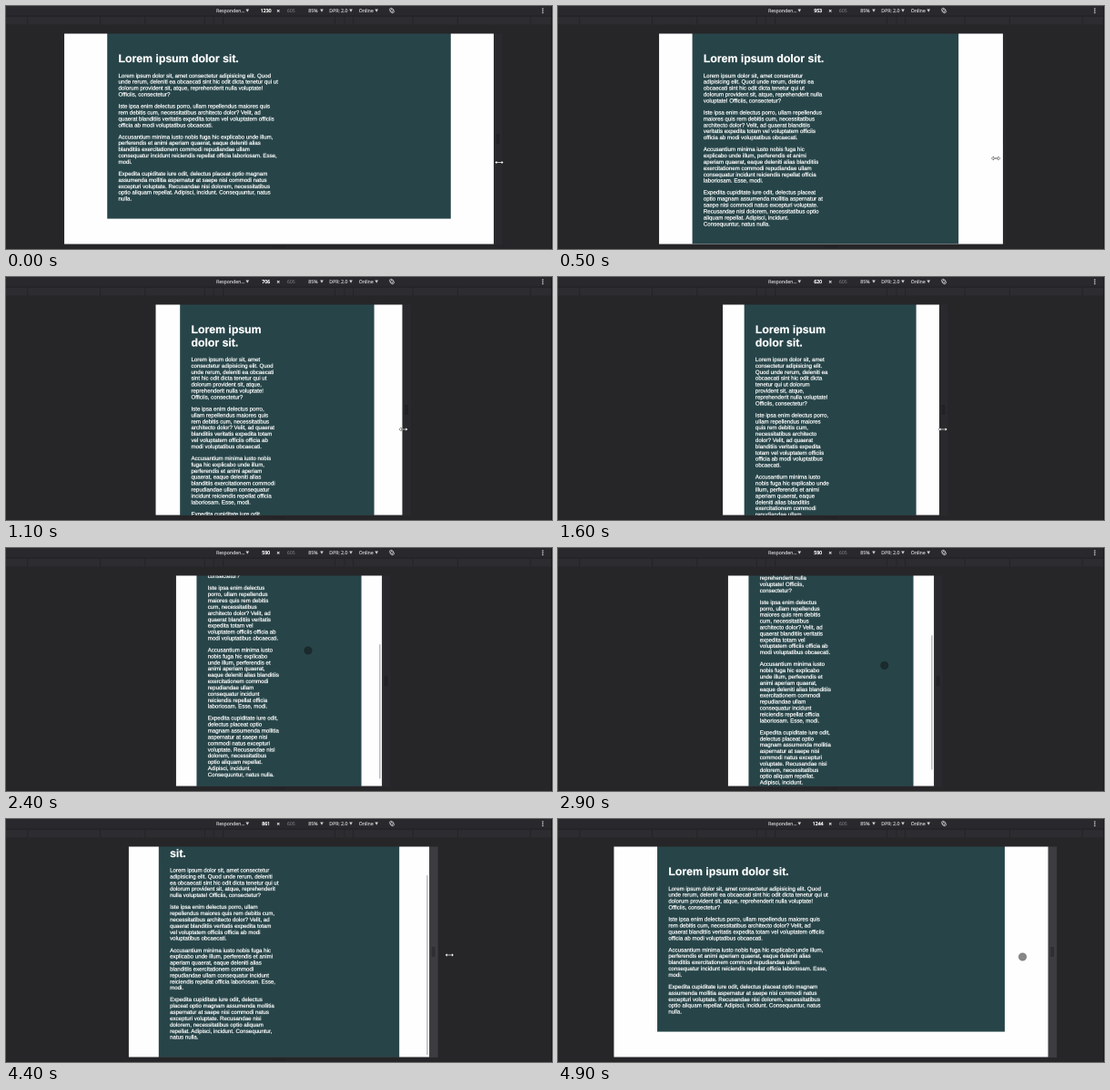
Write an HTML page with a canvas that moves like this. It is 600 by 268 pixels and loops after 5 s.

```html
<!DOCTYPE html>
<html lang="en">
<head>
<meta charset="utf-8">
<title>Responsive column</title>
<style>
  html, body { margin: 0; width: 100%; height: 100%; overflow: hidden; background: #262528; }
  canvas { display: block; width: 600px; height: 268px; }
</style>
</head>
<body>
<canvas id="stage" width="1200" height="536"></canvas>
<script>
const ctx = document.getElementById('stage').getContext('2d');
const LOOP = 5000, STEP = 100;
const CX = 300, TOP = 30.5, SCALE = 0.3837, VIEW_H = 605;
const WIDE = 1230, NARROW = 590, FINAL = 1244;
const UI = '"Open Sans", "Noto Sans", sans-serif';
const BODY = '"Liberation Sans", Arial, sans-serif';
const GRAY = '#d2d2d4';

const TITLE = 'Lorem ipsum dolor sit.';
const PARAS = [
  'Lorem ipsum dolor sit, amet consectetur adipisicing elit. Quod unde rerum, deleniti ea obcaecati sint hic odit dicta tenetur qui ut dolorum provident sit, atque, reprehenderit nulla voluptate! Officiis, consectetur?',
  'Iste ipsa enim delectus porro, ullam repellendus maiores quis rem debitis cum, necessitatibus architecto dolor? Velit, ad quaerat blanditiis veritatis expedita totam vel voluptatem officiis officia ab modi voluptatibus obcaecati.',
  'Accusantium minima iusto nobis fuga hic explicabo unde illum, perferendis et animi aperiam quaerat, eaque deleniti alias blanditiis exercitationem commodi repudiandae ullam consequatur incidunt reiciendis repellat officia laboriosam. Esse, modi.',
  'Expedita cupiditate iure odit, delectus placeat optio magnam assumenda mollitia aspernatur at saepe nisi commodi natus excepturi voluptate. Recusandae nisi dolorem, necessitatibus optio aliquam repellat. Adipisci, incidunt. Consequuntur, natus nulla.'
];

const part = (t, a, b) => Math.min(1, Math.max(0, (t - a) / (b - a)));
const ease = (t, a, b) => {
  const u = part(t, a, b);
  return u * u * (3 - 2 * u);
};
const mix = (a, b, k) => a + (b - a) * k;
const edge = width => CX + width * SCALE / 2;

// Page width: decays until it reaches the narrow size, then swings open.
function widthAt(t) {
  if (t > 3000) return mix(NARROW, FINAL, ease(t, 4090, 4790));
  return Math.max(NARROW, 560 + (WIDE - 560) * Math.exp(-Math.max(0, t - 200) / 562.3));
}

function scrollAt(t) {
  return ease(t, 2000, 2480) - 0.2 * Math.sin(Math.PI * part(t, 2600, 3200));
}

// The pointer leads the dragged edge, and leaves it to hover over the page.
function pointerAt(t) {
  const away = ease(t, 1600, 2400) - ease(t, 3700, 3800) + ease(t, 4700, 4900);
  const back = ease(t, 2600, 3200), out = ease(t, 3200, 3700);
  const hover = t > 4000 ? [510.5, 152]
    : [332 + 53.5 * back + 40.5 * out, 113 + 33 * back + 7 * out];
  const grip = edge(widthAt(t > 200 ? t + 60 : t)) + 6;
  const gripY = t < 3000 ? 168 + 4.5 * (1 - ease(t, 200, 500)) : 150;
  return [mix(grip, hover[0], away), mix(gripY, hover[1], away)];
}

function box(x, y, w, h, color) {
  ctx.fillStyle = color;
  ctx.fillRect(x, y, w, h);
}

function poly(points, fill, stroke) {
  ctx.beginPath();
  points.forEach(([x, y]) => ctx.lineTo(x, y));
  ctx.closePath();
  if (stroke) {
    ctx.strokeStyle = stroke;
    ctx.lineWidth = 0.7;
    ctx.stroke();
  }
  ctx.fillStyle = fill;
  ctx.fill();
}

// Text with a thin outline of its own colour for a little extra weight.
function write(text, x, y, font, color, weight) {
  ctx.font = font;
  ctx.fillStyle = ctx.strokeStyle = color;
  ctx.lineWidth = weight;
  ctx.fillText(text, x, y);
  ctx.strokeText(text, x, y);
}

function wrap(text, font, max) {
  ctx.font = font;
  const lines = [];
  let line = '';
  for (const word of text.split(' ')) {
    const next = line ? line + ' ' + word : word;
    if (line && ctx.measureText(next).width > max) {
      lines.push(line);
      line = word;
    } else line = next;
  }
  return lines.concat(line);
}

// Flows the article for a column width; sizes are in page pixels.
function flow(col) {
  const rows = [];
  let y = 53.44;
  const add = (text, font, lead, ascent) => {
    for (const line of wrap(text, font, col)) {
      rows.push({ line, font, y: y + ascent });
      y += lead;
    }
  };
  add(TITLE, `bold 32px ${BODY}`, 37, 29);
  y += 21.44;
  for (const p of PARAS) {
    add(p, `16px ${BODY}`, 18, 14);
    y += 16;
  }
  return { rows, height: y + 32 };
}

function label(text, x, arrowX) {
  write(text, x, 7.1, `5.2px ${UI}`, GRAY, 0.2);
  poly([[arrowX - 1.8, 3.5], [arrowX + 1.8, 3.5], [arrowX, 6.8]], GRAY);
}

function toolbar(width) {
  box(0, 0, 600, 10.5, '#29282c');
  box(0, 10.5, 600, 1, '#222125');
  label('Responden...', 231, 265.3);
  label('85%', 332.3, 347);
  label('DPR: 2.0', 355.3, 379);
  label('Online', 387.8, 407.2);
  ctx.textAlign = 'center';
  write(width, 285.7, 7.1, `5.2px ${UI}`, '#fff', 0.35);
  write('×', 299.2, 7.3, `6px ${UI}`, '#fff', 0.3);
  write('605', 313.3, 7.1, `5.2px ${UI}`, '#7c7c80', 0.1);
  ctx.textAlign = 'left';

  ctx.strokeStyle = GRAY;
  ctx.lineWidth = 0.8;
  ctx.save();
  ctx.translate(424, 5);
  ctx.rotate(Math.PI / 4);
  ctx.strokeRect(-1.1, -1.8, 2.2, 3.6);
  ctx.restore();
  for (const a of [0.1, 3.24]) {
    ctx.beginPath();
    ctx.arc(424, 5, 2.8, a, a + 1.5);
    ctx.stroke();
  }
  for (const y of [2.4, 4.6, 6.8]) box(589.2, y, 1.3, 1.3, '#e4e4e6');

  // Breakpoint bars
  box(0, 12, 600, 8.5, '#2d2c30');
  for (const w of [320, 375, 425, 768, 1024, 1440]) {
    for (const x of [edge(w), edge(-w)]) box(x - 0.5, 12, 1, 8.5, '#252428');
  }
}

function handles(width, lit) {
  const x = edge(width);
  box(x, TOP, 9.5, 232.5, lit ? '#3d3c40' : '#2a292d');
  box(x + 2.6, 141, 3.8, 11, lit ? '#2f2e32' : '#222125');
  box(293, 264.6, 14, 1.6, '#222125');
}

function page(t, outer, inner) {
  const { rows, height } = flow(inner * 0.4 - 32);
  const room = Math.max(0, height - VIEW_H);
  const scroll = room * scrollAt(t);

  ctx.save();
  ctx.translate(edge(-outer), TOP);
  ctx.scale(SCALE, SCALE);
  ctx.beginPath();
  ctx.rect(0, 0, outer, VIEW_H);
  ctx.clip();
  box(0, 0, outer, VIEW_H, '#fffefe');
  box(inner * 0.1, -scroll, inner * 0.8, height, '#274549');
  for (const { line, font, y } of rows) {
    write(line, inner * 0.1 + 32, y - scroll, font, '#fff', 0.6);
  }
  const shown = (t > 2000 && t < 3200) || t > 4000;
  if (shown && room > 1) {
    const track = VIEW_H - 12;
    box(outer - 8, 6 + track * scroll / height, 4, track * VIEW_H / height, 'rgba(120,120,120,.5)');
  }
  ctx.restore();
}

function pointer(t) {
  const [x, y] = pointerAt(t);
  const shape = points => poly(points.map(([a, b]) => [x + a, y + b]), '#fff', '#111');
  if ((t > 1700 && t < 3500) || t >= 4800) {
    ctx.beginPath();
    ctx.arc(x, y, 4.3, 0, 7);
    ctx.fillStyle = 'rgba(15,15,15,.5)';
    ctx.fill();
    ctx.strokeStyle = 'rgba(15,15,15,.25)';
    ctx.lineWidth = 0.8;
    ctx.stroke();
  } else if (t >= 3500 && t < 3800) {
    shape([[0, -1], [0, 6], [1.6, 4.6], [2.7, 7], [3.7, 6.5], [2.7, 4.2], [4.8, 4.2]]);
  } else {
    const half = [[-4.6, 0], [-2.6, -1.8], [-2.6, -0.4], [2.6, -0.4], [2.6, -1.8]];
    shape(half.concat(half.map(([a, b]) => [-a, -b])));
  }
}

function draw(t) {
  const inner = widthAt(t);
  const outer = t < 2000 ? widthAt(t - 44) : inner;
  const shown = Math.round(t < 800 ? inner : outer);
  ctx.setTransform(2, 0, 0, 2, 0, 0);
  ctx.textRendering = 'geometricPrecision';
  ctx.lineJoin = 'round';
  box(0, 0, 600, 268, '#262528');
  toolbar(shown);
  handles(shown, t >= 3900);
  box(599, 0, 1, 268, '#19181b');
  page(t, outer, inner);
  pointer(t);
}

function tick() {
  const t = performance.now() % LOOP;
  draw(Math.floor(t / STEP) * STEP);
  requestAnimationFrame(tick);
}
tick();
</script>
</body>
</html>
```
